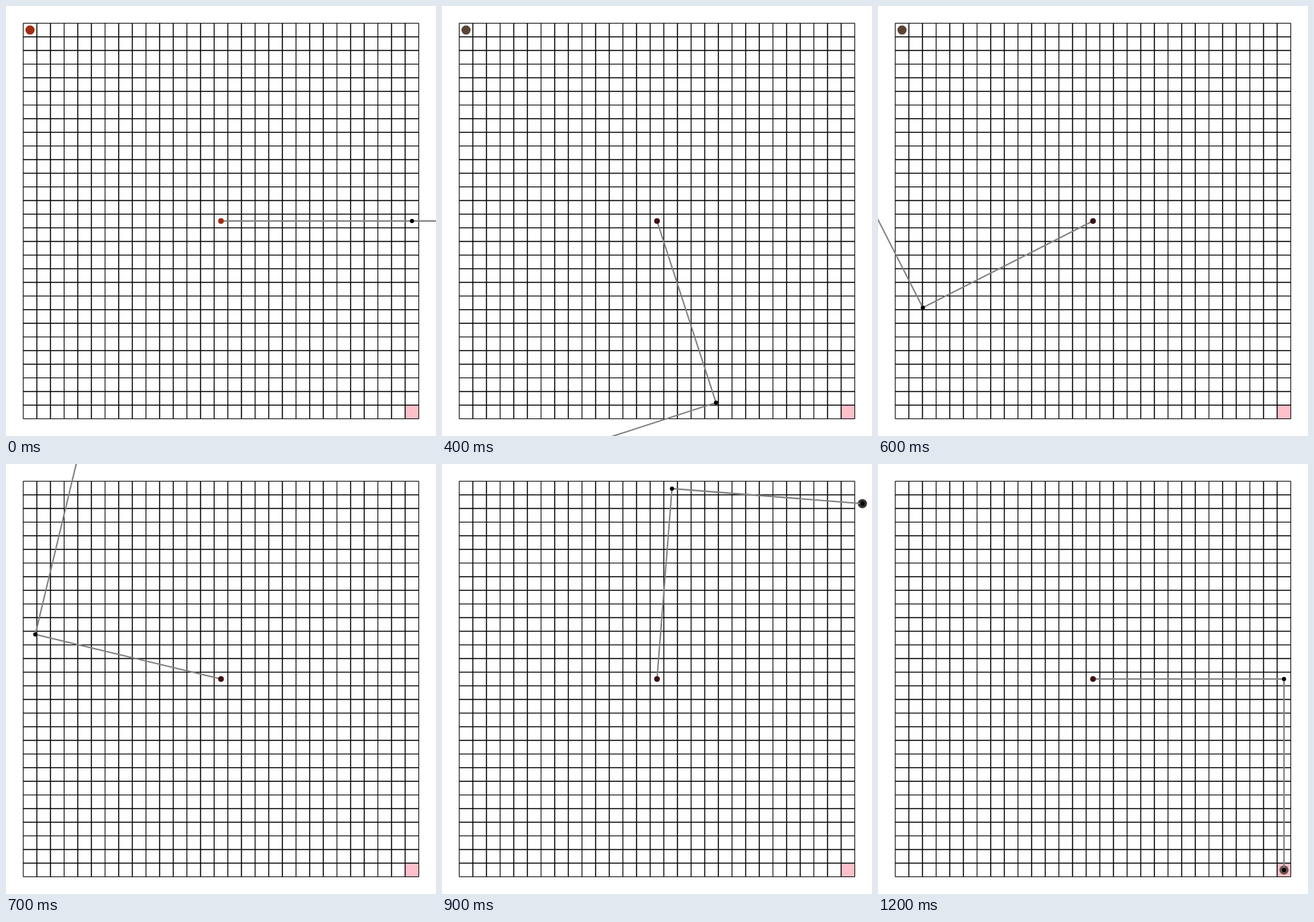
An HTML page that plays this animation: 610 px wide and 610 px high, repeating every 4200 ms.

```html
<!DOCTYPE html>
<html lang="en">
<head>
<meta charset="utf-8">
<title>Two-joint arm</title>
<style>
  html, body { margin: 0; width: 100%; height: 100%; overflow: hidden; background: #fff; }
  svg { display: block; width: 100vw; height: 100vh; }
</style>
</head>
<body>
<svg viewBox="0 0 610 610">
  <rect id="goal" fill="#ffc0cb"/>
  <g fill="none" stroke="#000">
    <path id="frame"/>
    <path id="lines"/>
    <path id="overlay"/>
  </g>
  <circle id="load" r="6.5"/>
  <path id="arm" fill="none" stroke="#808080" stroke-width="2"/>
  <circle id="base" cx="305" cy="305" r="4"/>
  <circle id="elbow" r="3"/>
  <circle id="tip" r="3"/>
</svg>
<script>
const CELLS = 29, MARGIN = 24.4, SIZE = 610 - 2 * MARGIN, CELL = SIZE / CELLS;
const CENTER = 305, REACH = 14 * CELL;
const STEP = 100, LAST = 12, LOOP = 4200, TURN = 40.5;
const $ = id => document.getElementById(id);

function set(id, attrs) {
  for (const key in attrs) $(id).setAttribute(key, attrs[key]);
}

function buildGrid() {
  const end = MARGIN + SIZE;
  let d = '';
  for (let i = 1; i < CELLS; i++) {
    const p = MARGIN + i * CELL;
    d += `M${p} ${MARGIN}V${end}M${MARGIN} ${p}H${end}`;
  }
  // Neighbouring cells share inner edges, so those are stroked twice.
  set('lines', { d });
  set('overlay', { d });
  set('frame', { d: `M${MARGIN} ${MARGIN}H${end}V${end}H${MARGIN}Z` });
  set('goal', { x: end - CELL, y: end - CELL, width: CELL, height: CELL });
}

function polar(from, deg) {
  const a = deg * Math.PI / 180;
  return { x: from.x + REACH * Math.cos(a), y: from.y + REACH * Math.sin(a) };
}

function loadColor(step, held) {
  if (held) return step < LAST ? '#333333' : '#69504a';
  return step === 0 ? '#a02c10' : step < 3 ? '#6b4a2f' : '#5c4433';
}

function draw(time) {
  const step = Math.min(Math.floor(time % LOOP / STEP), LAST);
  const turned = step * TURN;
  // The forearm bends to a right angle first, then the shoulder goes round once.
  const bend = Math.min(turned, 90);
  const shoulder = Math.min(Math.max(turned - 90, 0), 360);
  const held = shoulder >= 180;

  const hub = { x: CENTER, y: CENTER };
  const elbow = polar(hub, shoulder);
  const tip = polar(elbow, shoulder + bend);
  const start = { x: CENTER - REACH, y: CENTER - REACH };
  const load = held ? tip : start;

  set('arm', { d: `M${hub.x} ${hub.y}L${elbow.x} ${elbow.y}L${tip.x} ${tip.y}` });
  set('elbow', { cx: elbow.x, cy: elbow.y });
  set('tip', { cx: tip.x, cy: tip.y });
  set('load', { cx: load.x, cy: load.y, fill: loadColor(step, held) });
  set('base', { fill: step === 0 ? '#a02c10' : '#401010' });
}

buildGrid();
const begin = performance.now();
function tick() {
  draw(performance.now() - begin);
  requestAnimationFrame(tick);
}
tick();
</script>
</body>
</html>
```
